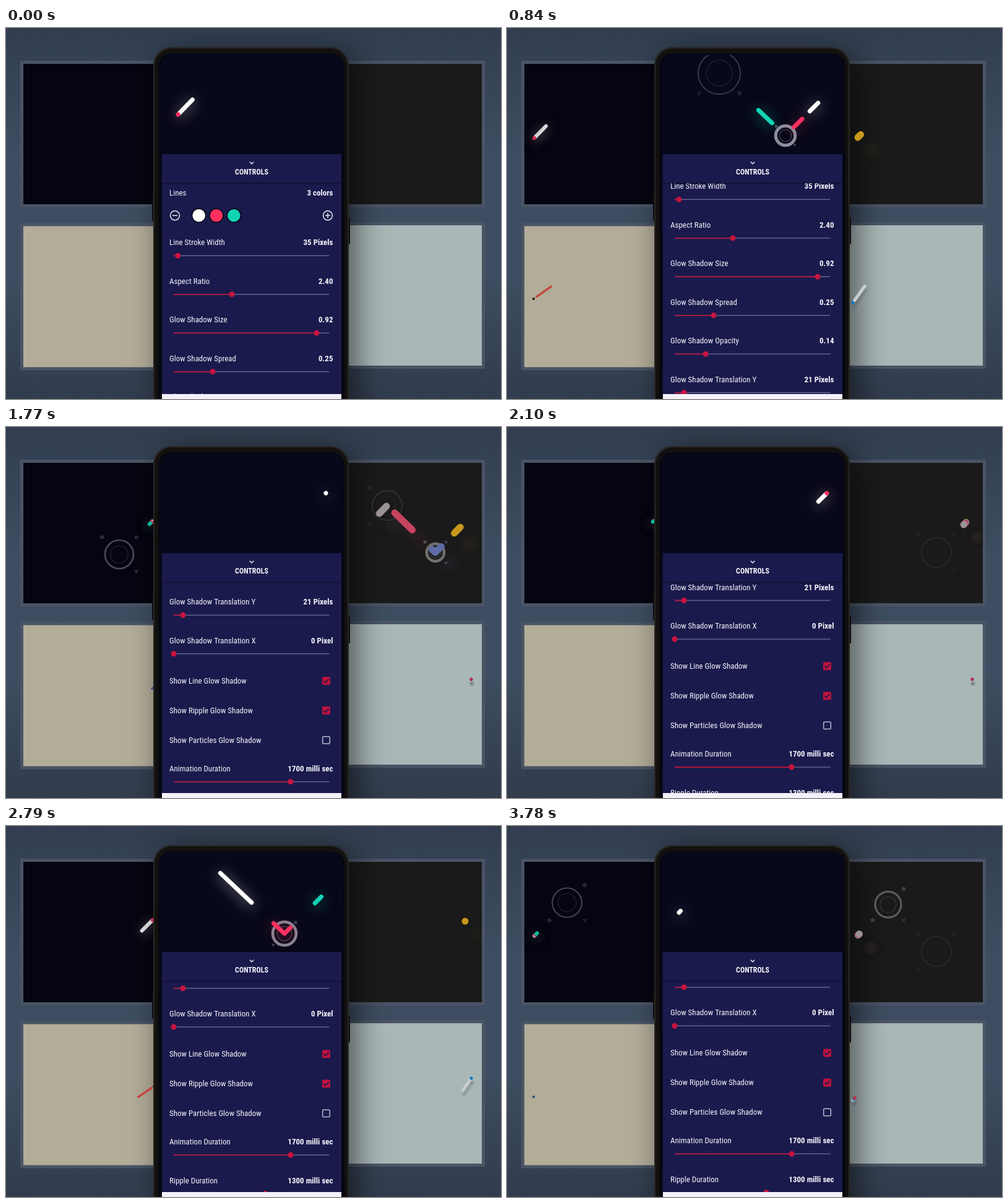
An HTML page with a canvas that plays this animation: 800x600 px, repeating every 3810 ms.

```html
<!DOCTYPE html>
<html lang="en">
<head>
<meta charset="utf-8">
<title>Line loader controls</title>
<style>
  html, body { margin: 0; width: 100%; height: 100%; overflow: hidden; background: #364355; }
  canvas { display: block; }
</style>
</head>
<body>
<canvas id="stage" width="800" height="600"></canvas>
<script>
const LOOP = 3810, STEP = 30;
const ctx = document.getElementById('stage').getContext('2d');
const FONT = "'Roboto Condensed', Roboto, sans-serif";

// Monotone cubic through [x, y] keys
function curve(keys, x) {
  const n = keys.length - 1;
  if (x <= keys[0][0]) return keys[0][1];
  if (x >= keys[n][0]) return keys[n][1];
  const grade = i => (keys[i + 1][1] - keys[i][1]) / (keys[i + 1][0] - keys[i][0]);
  const tangent = i => {
    if (i === 0 || i === n) return 0;
    const a = grade(i - 1), b = grade(i);
    return a * b <= 0 ? 0 : 2 * a * b / (a + b);
  };
  let i = 0;
  while (keys[i + 1][0] < x) i++;
  const h = keys[i + 1][0] - keys[i][0], u = (x - keys[i][0]) / h, v = 1 - u;
  return v * v * (1 + 2 * u) * keys[i][1] + u * v * v * h * tangent(i)
    + u * u * (3 - 2 * u) * keys[i + 1][1] - u * u * v * h * tangent(i + 1);
}

const TRAVEL = [[-500, 0], [-230, .05], [0, .1], [130, .215], [360, .53],
  [600, .78], [840, .94], [930, .997], [1600, 1]];
const SCROLL = [[300, 0], [840, 91], [1200, 272], [1770, 376.5], [2430, 413], [3100, 420]];
const LEAD = 700;
const CORNER_HITS = [178, 545];

// lag: exponents for head and tail of each line; at/rate: timing of a pass
const phoneLoader = {
  points: [[278, 140], [343, 73], [450, 174], [517, 107]],
  colors: ['#ffffff', '#ff3060', '#10d3b4'], width: 7,
  lag: [1, 2, 3, 4.1, 7.5, 10],
  passes: [{ at: 0, rate: 1 }, { at: 2285, rate: 1.03, back: true }, { at: 4180, rate: 1 }],
  ripple: { size: 34, rate: 1, color: '#e6e6f0' },
  glow: [.55, 22, 0, 3]
};
const panelLoaders = [{
  points: [[44, 178], [97, 124], [183, 206], [237, 152]],
  colors: ['#d6d6d8', '#d02a52', '#10b89c'], width: 6,
  lag: [1, 2.2, 3.4, 4.2, 6.5, 9],
  passes: [{ at: 840, rate: 1 }, { at: 2820, rate: 1, back: true }],
  ripple: { size: 24, rate: 1.4, color: '#c4c4d2' },
  glow: [.5, 18, 0, 3]
}, {
  points: [[567, 177], [616, 127], [694, 203], [742, 154]],
  colors: ['#c9971c', '#5f6ca6', '#c8435f', '#9a9297'], width: 11,
  lag: [1, 2.3, 5.5, 8, 14.6, 22.8, 28, 34],
  passes: [{ at: 1098, rate: 1.28 },
    { at: 3099, rate: 1.6, back: true, lag: [1, 2, 2.5, 3.5, 5, 6, 7, 8] }],
  ripple: { size: 24, rate: 1.4, color: '#b4b4b4' },
  glow: [.13, 16, 20, 22]
}, {
  points: [[43, 438], [98, 399], [185, 458], [239, 421]],
  colors: ['#c4453c', '#0b0b10', '#0b0b10', '#34465c', '#2a7c8a', '#2f4f8a'], width: 3.4,
  lag: [1, 1.95, 7.1, 10, 12.3, 14.5, 18, 24, 60, 90, 300, 400],
  passes: [{ at: 799, rate: 1.57 }, { at: 2760, rate: 1.57, back: true }],
  ripple: { size: 12, rate: 1.4, color: '#bb5548', thin: true }
}, {
  points: [[559, 444], [611, 372], [698, 485], [752, 408]],
  colors: ['#cbcdcd', '#1277bd', '#c02a48'], width: 5,
  lag: [1, 1.9, 6.2, 7.6, 10.7, 12],
  passes: [{ at: 840, rate: 1.6 },
    { at: 2886, rate: 1.1, back: true, lag: [1, 2.15, 3.3, 3.8, 5.7, 6.5] }],
  glow: [.28, 3, 1, 7, '70,80,100']
}];

const rows = [
  { y: 347, label: 'Line Stroke Width', value: '35 Pixels', knob: 278 },
  { y: 409.5, label: 'Aspect Ratio', value: '2.40', knob: 365 },
  { y: 472, label: 'Glow Shadow Size', value: '0.92', knob: 502 },
  { y: 534.5, label: 'Glow Shadow Spread', value: '0.25', knob: 334 },
  { y: 597, label: 'Glow Shadow Opacity', value: '0.14', knob: 321 },
  { y: 659.5, label: 'Glow Shadow Translation Y', value: '21 Pixels', knob: 286 },
  { y: 722, label: 'Glow Shadow Translation X', value: '0 Pixel', knob: 271 },
  { y: 787, label: 'Show Line Glow Shadow', check: true },
  { y: 835, label: 'Show Ripple Glow Shadow', check: true },
  { y: 883, label: 'Show Particles Glow Shadow', check: false },
  { y: 929, label: 'Animation Duration', value: '1700 milli sec', knob: 460 },
  { y: 991.5, label: 'Ripple Duration', value: '1300 milli sec', knob: 419 }
];

function rect(x, y, w, h, fill, radius = 0) {
  ctx.beginPath();
  ctx.roundRect(x, y, w, h, radius);
  ctx.fillStyle = fill;
  ctx.fill();
}

function disc(x, y, r, fill) {
  ctx.beginPath();
  ctx.arc(x, y, r, 0, 7);
  ctx.fillStyle = fill;
  ctx.fill();
}

function ring(x, y, r, color, width) {
  ctx.beginPath();
  ctx.arc(x, y, r, 0, 7);
  ctx.strokeStyle = color;
  ctx.lineWidth = width;
  ctx.stroke();
}

function line(points, color, width) {
  ctx.beginPath();
  points.forEach(p => ctx.lineTo(...p));
  ctx.strokeStyle = color;
  ctx.lineWidth = width;
  ctx.stroke();
}

function clipped(x, y, w, h, draw) {
  ctx.save();
  ctx.beginPath();
  ctx.rect(x, y, w, h);
  ctx.clip();
  draw();
  ctx.restore();
}

function setFont(weight, size) {
  ctx.font = `condensed ${weight} ${size}px ${FONT}`;
}

function text(str, x, y, weight, align, size = 13) {
  setFont(weight, size);
  ctx.textAlign = align;
  ctx.textBaseline = 'middle';
  ctx.letterSpacing = spacing;
  ctx.fillStyle = '#f4f4fb';
  ctx.fillText(str, x, y + .5);
}

setFont(400, 13);
const spacing = ctx.measureText('Glow Shadow Translation Y').width > 142 ? '-0.5px' : '0px';

// Part of a polyline between two fractions of its length
function slice(points, from, to) {
  const lens = points.slice(1).map((p, i) => Math.hypot(p[0] - points[i][0], p[1] - points[i][1]));
  const total = lens.reduce((a, b) => a + b);
  const a = from * total, b = Math.max(to * total, a + .02);
  const out = [];
  let pos = 0;
  lens.forEach((len, i) => {
    const lo = Math.max(a, pos), hi = Math.min(b, pos + len);
    const last = i === lens.length - 1;
    if (hi > lo || (last && !out.length)) {
      const at = d => points[i].map((v, k) => v + (points[i + 1][k] - v) * (d - pos) / len);
      if (!out.length) out.push(at(lo));
      out.push(at(last ? Math.max(hi, b) : hi));
    }
    pos += len;
  });
  return out;
}

function particle(x, y, kind, size) {
  ctx.save();
  ctx.translate(x, y);
  ctx.beginPath();
  if (kind === 0) ctx.arc(0, 0, size * .8, 0, 7);
  else {
    const sides = kind + 2;
    for (let i = 0; i < sides; i++) {
      const a = i * 2 * Math.PI / sides + Math.PI / 2 + (kind === 2 ? .3 : 0);
      ctx.lineTo(size * Math.cos(a), size * Math.sin(a));
    }
  }
  ctx.fill();
  ctx.restore();
}

function drawRipple({ size, rate, color, thin }, [x, y], elapsed, seed) {
  const age = elapsed * rate;
  if (age < 0 || age > 900) return;
  const u = Math.min(age / 620, 1);
  const r = size * (1 - Math.cos(Math.PI * u)) / 2;
  const fade = .9 * (1 - age / 900);
  ctx.globalAlpha = fade;
  ring(x, y, r, color, thin ? .8 : Math.max(1.8, 8 - age / 100));
  ctx.globalAlpha = fade * .5;
  ring(x, y, r * .62, color, thin ? .5 : 1.2);
  ctx.globalAlpha = fade * .85;
  const reach = r * (size > 30 ? 1.35 : 1.7);
  for (let i = 0; i < 3; i++) {
    const a = Math.PI * (.25 + .5 * (i + seed));
    ctx.fillStyle = ['#85858f', '#6a5a96', '#7c7f98'][i];
    particle(x + reach * Math.cos(a), y + reach * Math.sin(a), (i + seed) % 3, thin ? 1 : 4.5 * Math.sqrt(u));
  }
  ctx.globalAlpha = 1;
}

function drawLines(loader, pass, t) {
  const { colors, width, glow } = loader;
  const points = pass.back ? [...loader.points].reverse() : loader.points;
  const lag = pass.lag || loader.lag;
  const s = curve(TRAVEL, (t - pass.at) * pass.rate);
  ctx.lineCap = ctx.lineJoin = 'round';
  colors.forEach((color, i) => {
    if (i && s < .03 * i ** 1.8) return;
    ctx.save();
    if (glow) {
      const [alpha, blur, dx, dy, tint] = glow;
      const rgb = tint || [1, 3, 5].map(k => parseInt(color.slice(k, k + 2), 16)).join();
      ctx.shadowColor = `rgba(${rgb},${alpha})`;
      ctx.shadowBlur = blur;
      ctx.shadowOffsetX = dx;
      ctx.shadowOffsetY = dy;
    }
    line(slice(points, s ** lag[2 * i + 1], s ** lag[2 * i]), color, width);
    ctx.restore();
  });
}

function drawLoader(loader, t) {
  const { passes, points, ripple } = loader;
  if (ripple) passes.forEach((p, n) => CORNER_HITS.forEach((hit, i) => {
    const corner = points[p.back ? 2 - i : 1 + i];
    drawRipple(ripple, corner, t - p.at - hit / p.rate, n + i * 2);
  }));
  const pass = passes.filter(p => t >= p.at - LEAD).pop();
  if (pass) drawLines(loader, pass, t);
}

function drawBackdrop(t) {
  const sky = ctx.createLinearGradient(0, 0, 0, 600);
  ['#323e50', '#3d4c60', '#3e4d61', '#313c4d'].forEach((c, i) => sky.addColorStop(i / 3, c));
  rect(0, 0, 800, 600, sky);
  const panel = (x, y, h, fill) => {
    rect(x, y, 374, h, '#4a5465');
    rect(x + 5, y + 5, 364, h - 10, fill);
  };
  panel(23, 53, 237, '#050511');
  panel(400, 53, 237, '#1a1a1a');
  panel(23, 315.5, 238, '#b3ac99');
  panel(400, 314, 237, '#a9b7b7');

  ctx.save();
  ctx.shadowColor = 'rgba(0,0,0,.55)';
  ctx.shadowBlur = 50;
  ctx.shadowOffsetX = 12;
  ctx.shadowOffsetY = 8;
  rect(238, 31, 316, 640, '#111', 30);
  ctx.restore();
  panelLoaders.forEach(l => drawLoader(l, t));
}

function drawPhone() {
  rect(236, 268, 4, 44, '#0d0e12', 1);
  rect(552, 306, 4, 44, '#0d0e12', 1);
  rect(238, 31, 316, 640, '#2a2724', 30);
  rect(240, 33, 312, 640, '#12110f', 28);
  rect(246, 41, 301, 640, '#060711', 21);
  rect(250, 42, 294, 300, '#070819', 19);
}

function drawColors(y) {
  text('Lines', 264, y, 400, 'left');
  text('3 colors', 528.5, y, 700, 'right');
  ctx.lineCap = 'butt';
  const cy = y + 36.3;
  [273, 520].forEach((x, i) => {
    ring(x, cy, 7.5, '#eeeef6', 1.5);
    line([[x - 4, cy], [x + 4, cy]], '#eeeef6', 1.5);
    if (i) line([[x, cy - 4], [x, cy + 4]], '#eeeef6', 1.5);
  });
  phoneLoader.colors.forEach((c, i) => {
    disc(311.7 + i * 28.3, cy, 12, '#08081a');
    disc(311.7 + i * 28.3, cy, 10.3, c);
  });
}

function drawRow({ label, value, knob, check }, y) {
  text(label, 264, y, 400, 'left');
  if (value) {
    text(value, 528.5, y, 700, 'right');
    const sy = y + 21.3;
    ctx.lineCap = 'butt';
    line([[271, sy], [522.5, sy]], '#62628c', 1.6);
    line([[271, sy], [knob, sy]], '#b5143f', 1.8);
    disc(knob, sy, 4.5, '#c8143f');
  } else if (check) {
    rect(511, y - 6.5, 13, 13, '#bd123f', 2);
    ctx.lineCap = 'butt';
    ctx.lineJoin = 'miter';
    line([[513.3, y], [516.2, y + 2.9], [521.8, y - 2.9]], '#1a1a4c', 1.6);
  } else {
    ctx.beginPath();
    ctx.roundRect(511.7, y - 5.8, 11.6, 11.6, 1.5);
    ctx.strokeStyle = '#b9b9cf';
    ctx.lineWidth = 1.5;
    ctx.stroke();
  }
}

function drawControls(scroll) {
  rect(252, 204, 290, 396, '#1a1a4c');
  clipped(252, 251, 290, 341, () => {
    drawColors(267 - scroll);
    rows.forEach(r => {
      const y = r.y - scroll;
      if (y > 215 && y < 610) drawRow(r, y);
    });
  });
  const edge = ctx.createLinearGradient(0, 250, 0, 254);
  edge.addColorStop(0, 'rgba(8,8,32,.55)');
  edge.addColorStop(1, 'rgba(8,8,32,0)');
  rect(252, 250, 290, 4, edge);
  ctx.lineCap = 'butt';
  ctx.lineJoin = 'miter';
  line([[393.8, 216.5], [397, 219.7], [400.2, 216.5]], '#f4f4fb', 1.4);
  text('CONTROLS', 397, 233, 700, 'center', 12);
  rect(252, 592, 290, 8, '#f5f1f9');
}

function render(t) {
  drawBackdrop(t);
  drawPhone();
  clipped(250, 44, 294, 160, () => drawLoader(phoneLoader, t));
  drawControls(curve(SCROLL, t));
}

const start = performance.now();
function tick() {
  const t = (performance.now() - start) % LOOP;
  render(Math.floor(t / STEP) * STEP);
  requestAnimationFrame(tick);
}
tick();
</script>
</body>
</html>
```
